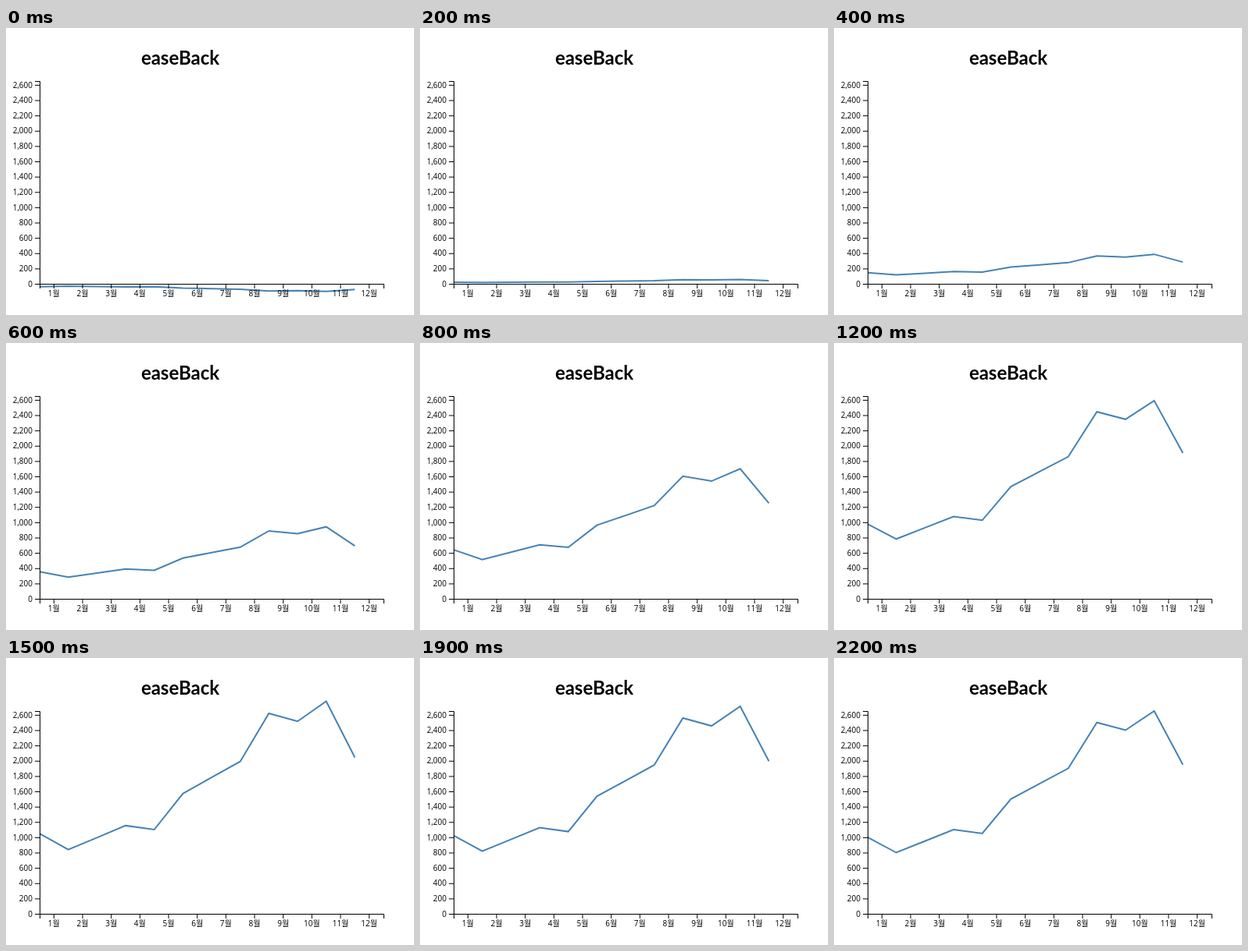
These frames come from a looping animation (522x368 px, 5200 ms). An HTML page:

```html
<!DOCTYPE html>
<html lang="ko">
<head>
<meta charset="utf-8">
<title>easeBack</title>
<style>
  html, body { margin: 0; width: 100%; height: 100%; overflow: hidden; background: #fff; }
  svg { display: block; }
  text { font: 10px "Open Sans", "Noto Sans CJK KR", "Noto Sans CJK", sans-serif; }
  .title { font: bold 24px Lato, sans-serif; text-anchor: middle; }
  .axis path { fill: none; stroke: #000; }
  .x text { text-anchor: middle; }
  .y text { text-anchor: end; }
  #line { fill: none; stroke: steelblue; stroke-width: 2; }
</style>
</head>
<body>
<svg width="522" height="368" viewBox="0 0 522 368">
  <text class="title" x="223" y="47">easeBack</text>
  <g transform="translate(43 68)">
    <path id="line"/>
    <g class="axis x" id="xAxis" transform="translate(0 260)"><path d="M.5 6V.5H440.5V6"/></g>
    <g class="axis y" id="yAxis"><path d="M-6 .5H.5V260.5H-6"/></g>
  </g>
</svg>
<script>
const WIDTH = 440, HEIGHT = 260, MAX = 2650;
const LOOP = 5200, STEP = 100, DURATION = 3000, HEAD_START = 797;
const sales = [1000, 800, 950, 1100, 1050, 1500, 1700, 1900, 2500, 2400, 2650, 1950];
const band = WIDTH / sales.length;
const yScale = value => HEIGHT * (1 - value / MAX);
const line = document.getElementById('line');

function addTick(axisId, tickPath, x, y, label) {
  document.getElementById(axisId).insertAdjacentHTML('beforeend',
    `<path d="${tickPath}"/><text x="${x}" y="${y}">${label}</text>`);
}

sales.forEach((_, i) => {
  const x = (i + 0.5) * band;
  addTick('xAxis', `M${x} 0V6`, x, 16.1, `${i + 1}월`);
});
for (let value = 0; value <= MAX; value += 200) {
  const y = yScale(value) + 0.5;
  addTick('yAxis', `M-6 ${y}H0`, -9, y + 3.2, value.toLocaleString('en-US'));
}

function easeBack(t) {
  const s = 1.70158, u = 2 * t, v = u - 2;
  return u < 1
    ? u * u * ((s + 1) * u - s) / 2
    : (v * v * ((s + 1) * v + s) + 2) / 2;
}

function draw() {
  const time = Math.floor(performance.now() % LOOP / STEP) * STEP;
  // The curve rests at its final pose once the easing has run out.
  const scale = easeBack(Math.min(1, (time + HEAD_START) / (DURATION - 3)));
  line.setAttribute('d', 'M' + sales.map((value, i) => `${i * band},${yScale(value * scale)}`).join('L'));
  requestAnimationFrame(draw);
}
draw();
</script>
</body>
</html>
```
